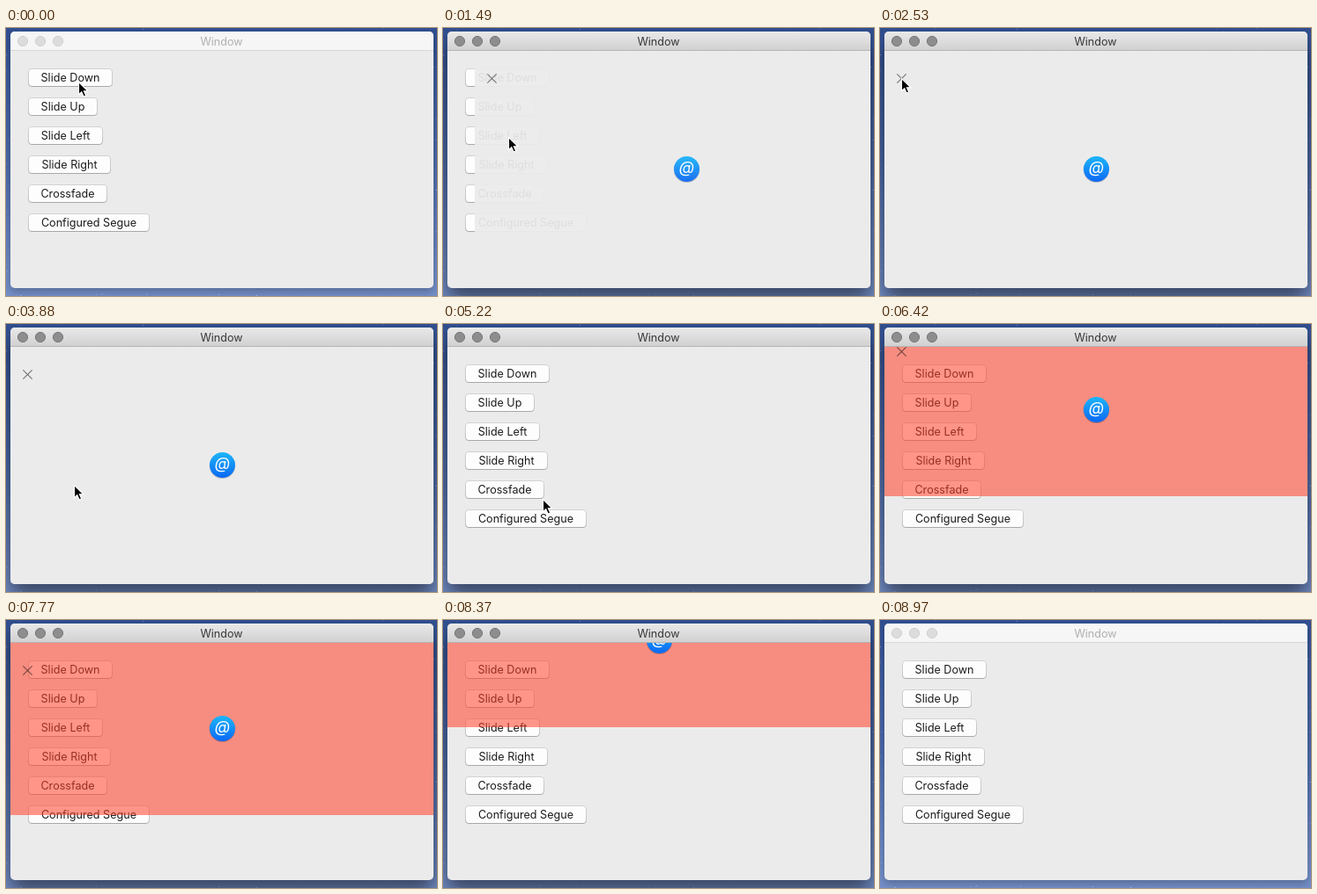
These frames come from a looping animation (489x305 px, 9070 ms). An HTML page:

```html
<!DOCTYPE html>
<html lang="en">
<head>
<meta charset="utf-8">
<title>View transitions</title>
<style>
  html, body { margin: 0; width: 100%; height: 100%; overflow: hidden; background: #4a669f; }
  svg { display: block; width: 489px; height: 305px; }
  text { font: 12.6px Inter, "Open Sans", sans-serif; text-anchor: middle; fill: #1c1c1c; }
</style>
</head>
<body>
<svg viewBox="0 0 489 305" xmlns="http://www.w3.org/2000/svg">
  <defs>
    <linearGradient id="sky" x2="0" y2="1">
      <stop stop-color="#314f90"/><stop offset=".5" stop-color="#4b69a8"/><stop offset="1" stop-color="#7590c9"/>
    </linearGradient>
    <linearGradient id="bar" x2="0" y2="1">
      <stop stop-color="#e9e9e9"/><stop offset="1" stop-color="#d1d1d1"/>
    </linearGradient>
    <linearGradient id="rim" x2="0" y2="1">
      <stop stop-color="#d2d2d2"/><stop offset=".75" stop-color="#c6c6c6"/><stop offset="1" stop-color="#a9a9a9"/>
    </linearGradient>
    <linearGradient id="blue" x2="0" y2="1">
      <stop stop-color="#1cb6fb"/><stop offset="1" stop-color="#0c68f4"/>
    </linearGradient>
    <filter id="soft" x="-20%" y="-20%" width="140%" height="140%"><feGaussianBlur stdDeviation="5"/></filter>
    <filter id="deep" x="-20%" y="-20%" width="140%" height="140%"><feGaussianBlur stdDeviation="11"/></filter>
    <clipPath id="frame"><rect x="5" y="4" width="480" height="292" rx="5"/></clipPath>
    <clipPath id="content"><path d="M5 26H485V291a5 5 0 0 1-5 5H10a5 5 0 0 1-5-5Z"/></clipPath>
    <g id="badge">
      <circle cy=".8" r="14.7" fill="#000" opacity=".2"/>
      <circle r="14.5" fill="url(#blue)"/>
      <text y="4.9" style="font-size:18px;font-style:italic;fill:#fff">@</text>
    </g>
    <path id="close" d="M-5.2-5.2 5.2 5.2M5.2-5.2-5.2 5.2" stroke="#000" stroke-opacity=".52" stroke-width="1.1"/>
  </defs>

  <rect width="489" height="305" fill="url(#sky)"/>
  <g id="stars" fill="#cfdcff"></g>
  <rect id="idleShadow" x="5" y="9" width="480" height="292" rx="5" opacity=".22" filter="url(#soft)"/>
  <rect id="activeShadow" x="5" y="18" width="480" height="292" rx="5" opacity=".5" filter="url(#deep)"/>

  <g clip-path="url(#frame)">
    <rect x="5" y="4" width="480" height="292" fill="#ebebeb"/>
    <rect id="titleBar" x="5" y="4" width="480" height="21"/>
    <rect id="titleLine" x="5" y="25" width="480" height="1"/>
    <g id="lights"></g>
    <text id="title" x="244.5" y="20">Window</text>
  </g>

  <g clip-path="url(#content)">
    <g id="buttons"></g>
    <g id="sheet">
      <rect x="5" y="26" width="480" height="270" fill="#ebebeb"/>
      <use href="#close" x="24.5" y="57.5"/>
      <use href="#badge" x="245.5" y="160.5"/>
    </g>
    <g id="panel">
      <rect x="5" y="26" width="480" height="196" fill="rgb(255,64,40)" fill-opacity=".55"/>
      <use href="#close" x="24.5" y="57.5"/>
      <use href="#badge" x="245.5" y="123.5"/>
    </g>
  </g>

  <path id="cursor" d="M0 0V14.2L3.3 11.2 5.7 16.6 8.2 15.5 5.9 10.3H10.4Z" stroke="#fff" stroke-width="1.1"/>
</svg>

<script>
const LOOP = 9070, FIRST = 600, TICK = 149.3;
const SHEET_SHIFT = 480, PANEL_HEIGHT = 196;
const $ = id => document.getElementById(id);

function add(parent, tag, attrs, text) {
  const el = document.createElementNS("http://www.w3.org/2000/svg", tag);
  set(el, attrs);
  if (text) el.textContent = text;
  parent.appendChild(el);
  return el;
}

function set(el, attrs) {
  for (const key in attrs) el.setAttribute(key, attrs[key]);
}

// Static parts
let seed = 11;
const random = () => (seed = seed * 16807 % 2147483647) / 2147483647;
for (let i = 0; i < 900; i++) {
  const size = random() < .1 ? 1.5 : 1;
  add($("stars"), "rect", {
    x: Math.floor(random() * 489), y: Math.floor(random() * 305),
    width: size, height: size, opacity: (.1 + .5 * random() ** 3).toFixed(2)
  });
}

[["Slide Down", 96], ["Slide Up", 79], ["Slide Left", 85],
 ["Slide Right", 94], ["Crossfade", 90], ["Configured Segue", 138]].forEach(([label, width], i) => {
  const y = 46 + 33 * i;
  add($("buttons"), "rect", {
    x: 25.5, y: y + .5, width: width - 1, height: 20, rx: 3.5, fill: "#fdfdfd", stroke: "url(#rim)"
  });
  add($("buttons"), "text", { x: 25 + width / 2, y: y + 15 }, label);
});

for (const x of [19, 39, 59]) add($("lights"), "circle", { cx: x, cy: 15, r: 5.6 });

// Motion
const clamp = v => Math.min(1, Math.max(0, v));

// cubic-bezier(.42, 0, .58, 1)
function easeInOut(x) {
  if (x <= 0 || x >= 1) return clamp(x);
  let low = 0, high = 1;
  for (let i = 0; i < 24; i++) {
    const s = (low + high) / 2, r = 1 - s;
    if (1.26 * r * r * s + 1.74 * r * s * s + s ** 3 < x) low = s; else high = s;
  }
  return low * low * (3 - 2 * low);
}

// Rises from 0 to 1 at `show` and falls back at `hide`
const presence = (t, show, hide, duration) =>
  easeInOut((t - show) / duration) - easeInOut((t - hide) / duration);

// [time, x, y] of the pointer tip
const pointer = [
  [450, 82, 61], [890, 74, 124], [1640, 74, 124], [2220, 24, 57],
  [2740, 24, 57], [3340, 77, 183], [3940, 77, 183], [4540, 24, 57],
  [4900, 24, 57], [5228, 113, 199], [5480, 116, 229]
];

function pointerAt(t) {
  const i = pointer.findIndex(p => p[0] > t);
  if (i < 0) return pointer[pointer.length - 1].slice(1);
  if (i === 0) return pointer[0].slice(1);
  const [t0, x0, y0] = pointer[i - 1], [t1, x1, y1] = pointer[i];
  const k = easeInOut((t - t0) / (t1 - t0));
  return [x0 + (x1 - x0) * k, y0 + (y1 - y0) * k];
}

// The picture is refreshed in fixed ticks
function sample(t) {
  const n = Math.floor((t - FIRST + 9) / TICK);
  return n < 0 ? 0 : FIRST + n * TICK;
}

function render(time) {
  const t = sample(time % LOOP);

  const active = t > 1190 && t < 8950;
  set($("activeShadow"), { visibility: active ? "visible" : "hidden" });
  set($("idleShadow"), { visibility: active ? "hidden" : "visible" });
  set($("titleBar"), { fill: active ? "url(#bar)" : "#f6f6f6" });
  set($("titleLine"), { fill: active ? "#b5b5b5" : "#d9d9d9" });
  set($("lights"), { fill: active ? "#8d8d8d" : "#dcdcdc", stroke: active ? "#777" : "#cfcfcf" });
  $("title").style.fill = active ? "#383838" : "#b0b0b0";

  const slide = presence(t, 1249, 2400, 300);
  const fade = presence(t, 3460, 4650, 300);
  set($("sheet"), {
    opacity: Math.max(slide, fade),
    transform: `translate(${slide > 0 ? Math.round(SHEET_SHIFT * (1 - slide)) : 0} 0)`
  });

  const drop = presence(t, 5491, 7732, 1250);
  set($("panel"), {
    visibility: drop > 0 ? "visible" : "hidden",
    transform: `translate(0 ${-Math.round(PANEL_HEIGHT * (1 - drop))})`
  });

  const [x, y] = pointerAt(t);
  set($("cursor"), {
    visibility: t < 5800 ? "visible" : "hidden",
    transform: `translate(${Math.round(x) + .5} ${Math.round(y) + .5})`
  });
}

const start = performance.now();
function loop() {
  render(performance.now() - start);
  requestAnimationFrame(loop);
}
loop();
</script>
</body>
</html>
```
